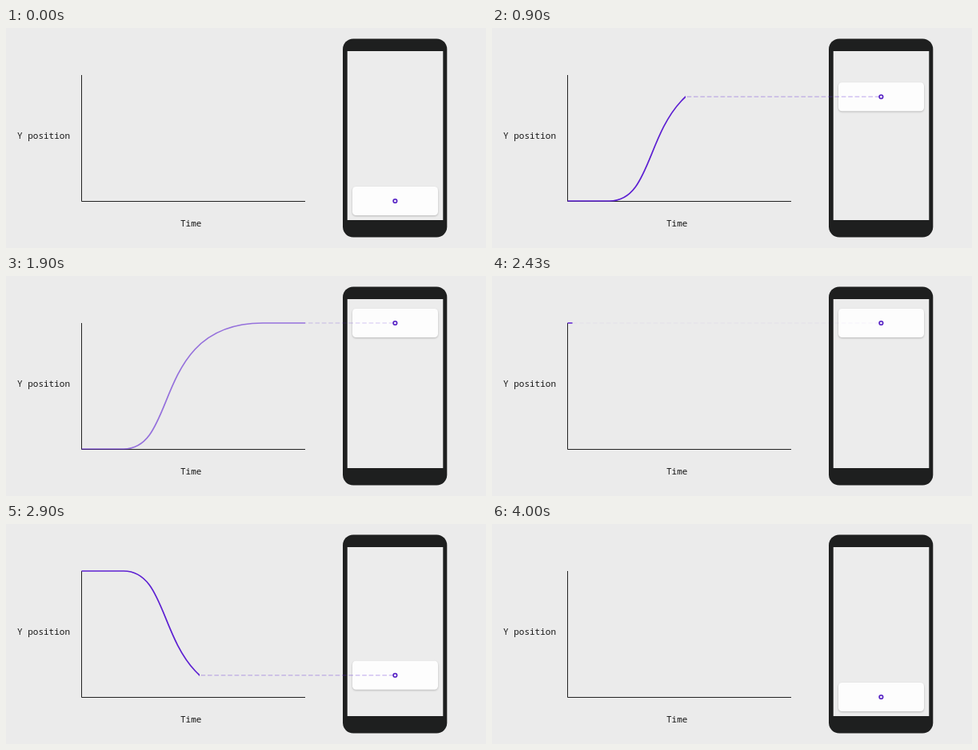
Write an HTML page that moves like this. It is 600 px wide and 276 px high and loops after 4.03 s.

```html
<!DOCTYPE html>
<html lang="en">
<head>
<meta charset="utf-8">
<title>Easing curve</title>
<style>
  html, body { margin: 0; width: 100%; height: 100%; overflow: hidden; background: #ebebeb; }
  svg { display: block; width: 600px; height: 276px; }
  text { font: 500 11px "Roboto Mono", "Noto Sans Mono", "DejaVu Sans Mono", monospace; fill: #151515; }
  #card rect { fill: #fdfdfd; filter: drop-shadow(0 1px 1.2px rgba(0, 0, 0, .22)); }
</style>
</head>
<body>
<svg viewBox="0 0 600 276">
  <defs>
    <clipPath id="reveal"><rect id="window" x="93" y="0" width="0" height="276"/></clipPath>
  </defs>
  <rect width="600" height="276" fill="#ebebeb"/>
  <text x="14" y="138.5">Y position</text>
  <text x="218" y="248.5">Time</text>
  <path d="M94.5 59V217.5H374" fill="none" stroke="#222" stroke-width="1"/>

  <rect x="421" y="13.5" width="130.3" height="249" rx="13" fill="#1e1f1f"/>
  <rect x="426.7" y="29" width="119.6" height="212" fill="#ececec"/>
  <g id="card">
    <rect x="433" y="-18" width="107" height="36" rx="4.5"/>
  </g>

  <g id="trace">
    <path id="dash" fill="none" stroke="#5b21d0" stroke-width="1.4" stroke-dasharray="5.6 2.8"/>
    <g clip-path="url(#reveal)">
      <path id="curve" fill="none" stroke="#5d20d2" stroke-width="1.7"/>
    </g>
  </g>
  <circle id="dot" cx="486.4" r="2.3" fill="#f1ecfb" stroke="#5520c4" stroke-width="1.6"/>
</svg>
<script>
  const LOOP = 4030, FRAME = 100 / 3, HALF = 60;
  const LEFT = 94.5, RIGHT = 374, LOW = 217, HIGH = 59;
  const RISE = 147, SETTLE = 321, SPEED = 10.1, START = 12.4;
  const DOT_X = 486.4;
  const $ = id => document.getElementById(id);
  const clamp = (v, a = 0, b = 1) => Math.min(b, Math.max(a, v));

  const bezier = (a, b, t) => 3 * a * t * (1 - t) ** 2 + 3 * b * t * t * (1 - t) + t ** 3;

  // cubic-bezier(0.4, 0, 0.2, 1)
  function ease(x) {
    if (x <= 0 || x >= 1) return clamp(x);
    let lo = 0, hi = 1;
    for (let i = 0; i < 24; i++) {
      const mid = (lo + hi) / 2;
      if (bezier(0.4, 0.2, mid) < x) lo = mid; else hi = mid;
    }
    return bezier(0, 1, lo);
  }

  function curvePath(from, to) {
    const w = SETTLE - RISE;
    return `M${LEFT} ${from}H${RISE}C${RISE + 0.4 * w} ${from} ${RISE + 0.2 * w} ${to} ${SETTLE} ${to}H${RIGHT}`;
  }

  function draw(ms) {
    const tick = Math.floor((ms % LOOP) / FRAME + 0.11);
    const down = tick > HALF;
    const f = down ? tick - HALF : tick;
    const [from, to] = down ? [HIGH, LOW] : [LOW, HIGH];

    const tip = clamp(LEFT + SPEED * (f - START), LEFT, RIGHT);
    const y = from + (to - from) * ease((tip - RISE) / (SETTLE - RISE));

    $("card").setAttribute("transform", `translate(0 ${y})`);
    $("dot").setAttribute("cy", y);
    $("curve").setAttribute("d", curvePath(from, to));
    $("window").setAttribute("width", Math.max(0, tip - 93));
    $("dash").setAttribute("d", `M${DOT_X - 2} ${y}H${tip}`);
    $("dash").setAttribute("opacity", 0.27 * clamp((f - START) / 5));
    $("trace").setAttribute("opacity", f > START ? clamp((HALF - f) / 5) : 0);
  }

  const begin = performance.now();
  function loop() {
    draw(performance.now() - begin);
    requestAnimationFrame(loop);
  }
  loop();
</script>
</body>
</html>
```
